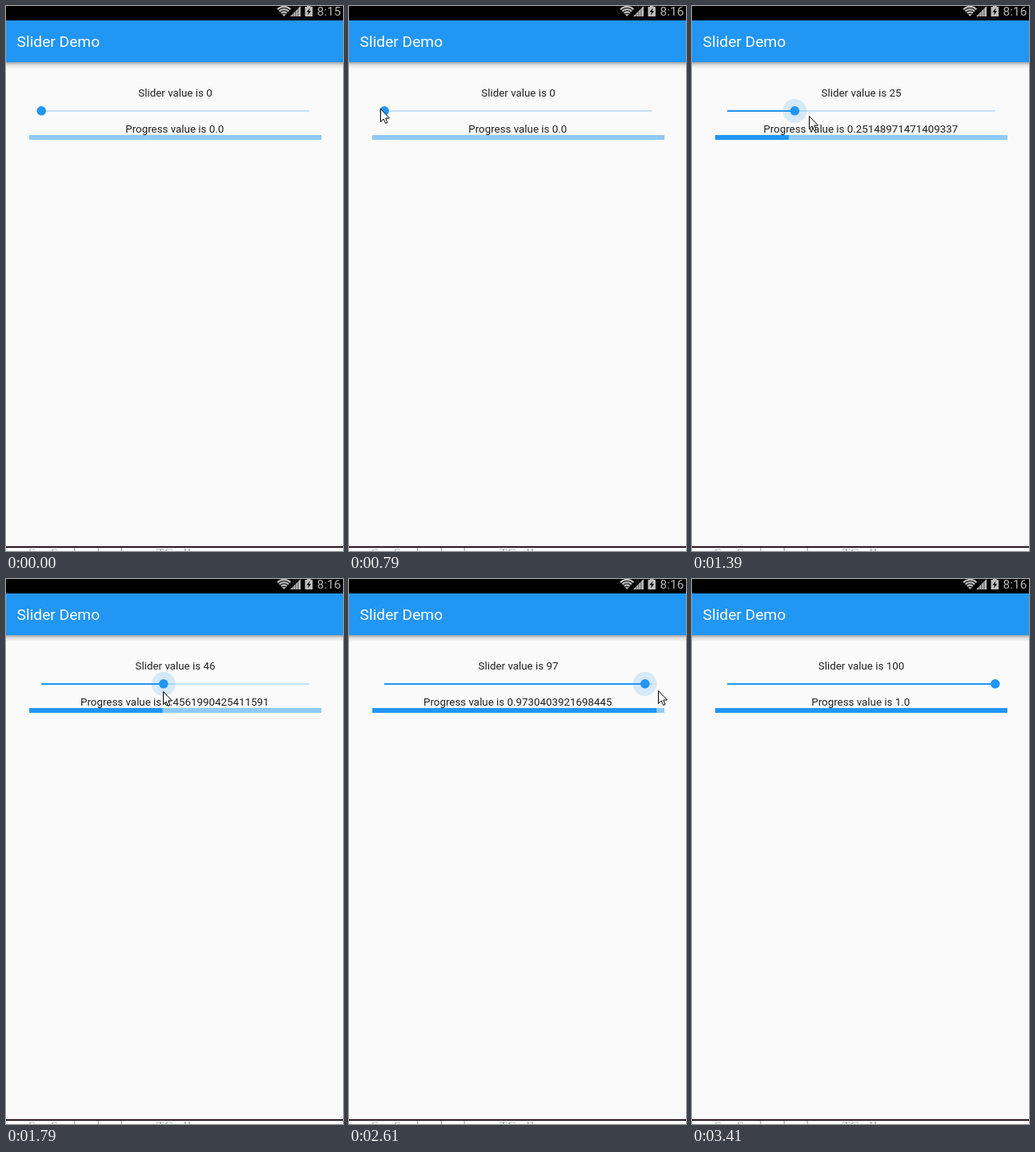
Recreate the animation shown at these times as an HTML page with a canvas. Size 421 by 680 pixels, loop 4430 ms.

```html
<!DOCTYPE html>
<html lang="en">
<head>
<meta charset="utf-8">
<title>Slider Demo</title>
<style>
  html, body { margin: 0; width: 100%; height: 100%; overflow: hidden; background: #fafafa; }
  canvas { display: block; }
</style>
</head>
<body>
<canvas id="stage" width="421" height="680"></canvas>
<script>
const ctx = document.getElementById('stage').getContext('2d');
const LOOP = 4430;
const BLUE = '#2196f3';
const STATUS = '#bdbdbd';
const TRACK = { x: 44, width: 334.6, y: 131 };
const BAR = { x: 29, width: 365, y: 161, height: 6 };

// Each step holds until the next: start, value text, pointer tip, thumb override
const steps = [
  { at: 0, value: '0.0' },
  { at: 200, value: '0.0', pointer: [82, 134] },
  { at: 370, value: '0.0', pointer: [52, 129] },
  { at: 590, value: '0.0', pointer: [40, 128] },
  { at: 790, value: '0.0', pointer: [39, 128] },
  { at: 990, value: '0.020262216924910607', pointer: [64, 132], pressed: true },
  { at: 1200, value: '0.13468414779499405', pointer: [110, 135], pressed: true },
  { at: 1390, value: '0.25148971471409337', pointer: [146, 137], pressed: true },
  { at: 1590, value: '0.2872467222884386', pointer: [160, 139], pressed: true },
  { at: 1790, value: '0.4561990425411591', pointer: [196, 140], pressed: true },
  { at: 2010, value: '0.5813468414779499', pointer: [244, 142], pressed: true },
  { at: 2210, value: '0.710841378245691', pointer: [292, 143], pressed: true },
  { at: 2410, value: '0.867103694874851', pointer: [357, 141], pressed: true },
  { at: 2610, value: '0.9730403921698445', pointer: [386, 139], pressed: true },
  { at: 2810, value: '1.0', pointer: [400, 141], pressed: true, thumb: 0.993 },
  { at: 3010, value: '1.0', pointer: [400, 141], pressed: true },
  { at: 3230, value: '1.0', pointer: [47, 317] },
  { at: 3410, value: '1.0' }
];

function rect(x, y, w, h, color) {
  ctx.fillStyle = color;
  ctx.fillRect(x, y, w, h);
}

function circle(x, y, r, color) {
  ctx.fillStyle = color;
  ctx.beginPath();
  ctx.arc(x, y, r, 0, Math.PI * 2);
  ctx.fill();
}

function polygon(points, color) {
  ctx.fillStyle = color;
  ctx.beginPath();
  points.forEach(([x, y]) => ctx.lineTo(x, y));
  ctx.closePath();
  ctx.fill();
}

function text(string, x, y, size, color, align = 'left', family = 'Roboto, sans-serif') {
  ctx.font = `${size}px ${family}`;
  ctx.textAlign = align;
  ctx.fillStyle = color;
  ctx.fillText(string, x, y);
}

function drawStatusBar(clock) {
  rect(0, 0, 421, 18, '#000');
  ctx.strokeStyle = STATUS;
  ctx.lineWidth = 2.3;
  for (const r of [5, 8.3, 11.6]) {
    ctx.beginPath();
    ctx.arc(347.3, 12.5, r, -Math.PI * 0.75, -Math.PI * 0.25);
    ctx.stroke();
  }
  polygon([[347.3, 13], [344.8, 10], [349.8, 10]], STATUS);
  polygon([[355, 13], [368, 13], [368, 0]], STATUS);
  for (const x of [358.5, 361.5, 364.5]) rect(x, 0, 0.8, 13, '#333');
  rect(373.5, 1, 9.5, 12, STATUS);
  rect(376, 0, 4.5, 1, STATUS);
  polygon([[379.5, 2.5], [375.5, 7.5], [378, 7.5], [377, 11.5], [381, 6.3], [378.6, 6.3]], '#000');
  text(clock, 388.6, 12, 15.4, '#b5b5b5');
}

function drawAppBar() {
  const shadow = ctx.createLinearGradient(0, 70, 0, 78);
  shadow.addColorStop(0, 'rgba(0,0,0,.36)');
  shadow.addColorStop(0.4, 'rgba(0,0,0,.12)');
  shadow.addColorStop(1, 'rgba(0,0,0,0)');
  rect(0, 70, 421, 8, shadow);
  rect(0, 18, 421, 52, BLUE);
  text('Slider Demo', 13.6, 51, 19.2, '#fff');
}

function drawSlider(position, pressed) {
  const { x, width, y } = TRACK;
  const thumb = x + width * position;
  rect(x, y - 1, width, 2, '#c6e2f8');
  rect(x, y - 1, thumb - x, 2, BLUE);
  if (pressed) circle(thumb, y, 15, 'rgba(33,150,243,.16)');
  circle(thumb + 0.2, y - 0.2, 5.8, BLUE);
}

function drawProgress(value) {
  const { x, width, y, height } = BAR;
  rect(x, y, width, height, '#90caf9');
  rect(x, y, width * value, height, BLUE);
}

function drawPageEdge() {
  rect(0, 674, 421, 2, '#2b1720');
  rect(0, 676, 421, 4, '#fff');
  const words = [['a', 12], ['So', 28], ['So', 56], ['be', 84], ['do', 109], ['do', 138], ['TC', 188], ['II', 221]];
  for (const [word, x] of words) {
    text(word, x, 688, 16, '#aaa', 'left', '"Liberation Serif", serif');
  }
}

function drawPointer(x, y) {
  ctx.save();
  ctx.translate(x + 0.5, y + 0.5);
  polygon([[0, 0], [0, 16], [3.7, 12.5], [6.2, 18], [8.5, 17], [6.2, 11.5], [11, 11.5]], '#fff');
  ctx.strokeStyle = '#000';
  ctx.lineWidth = 1;
  ctx.stroke();
  ctx.restore();
}

function draw(time) {
  const step = steps.findLast(s => s.at <= time);
  const value = Number(step.value);
  rect(0, 0, 421, 680, '#fafafa');
  drawStatusBar(time < 200 ? '8:15' : '8:16');
  drawAppBar();
  text(`Slider value is ${Math.round(value * 100)}`, 211.5, 113, 13.35, '#212121', 'center');
  drawSlider(step.thumb ?? value, step.pressed);
  text(`Progress value is ${step.value}`, 210.8, 158, 13.35, '#212121', 'center');
  drawProgress(value);
  drawPageEdge();
  if (step.pointer) drawPointer(...step.pointer);
}

const start = performance.now();
function tick() {
  draw((performance.now() - start) % LOOP);
  requestAnimationFrame(tick);
}
tick();
</script>
</body>
</html>
```
